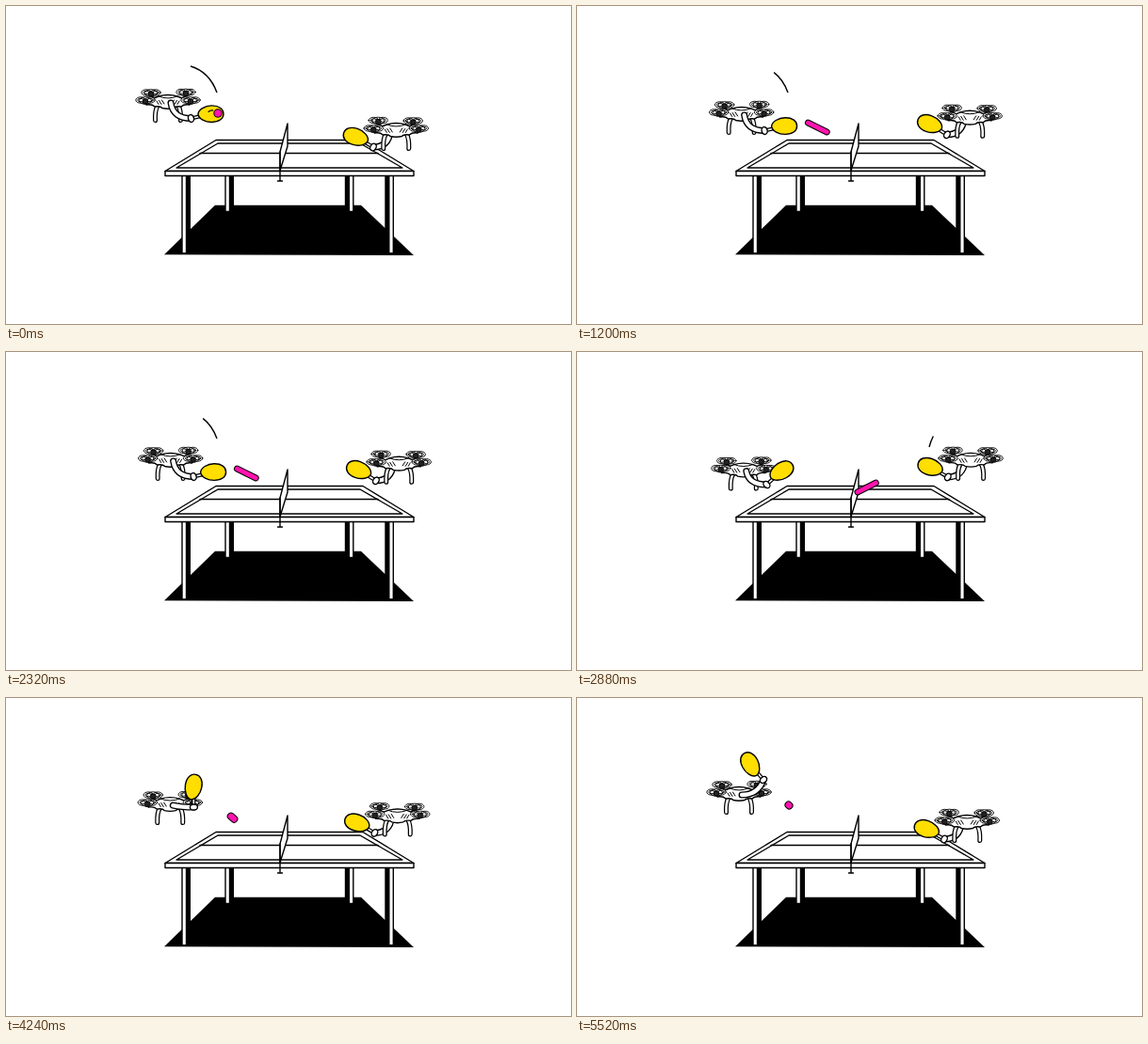
Recreate the animation shown at these times as an HTML page. Size 600 by 338 pixels, loop 5600 ms.

```html
<!DOCTYPE html>
<html lang="en">
<head>
<meta charset="utf-8">
<title>Drone table tennis</title>
<style>
html, body { margin: 0; width: 100%; height: 100%; overflow: hidden; background: #fff; }
svg { display: block; width: 100vw; height: 100vh; }
</style>
</head>
<body>
<svg viewBox="0 0 600 338" fill="none" stroke="#000" stroke-width="1.4" stroke-linejoin="round" stroke-linecap="round">
  <defs>
    <g id="rotor" stroke-width=".9">
      <ellipse cx="-5" rx="5.2" ry="3.2" fill="#fff"/>
      <ellipse cx="5" rx="5.2" ry="3.2" fill="#fff"/>
      <ellipse cx="-5" rx="3.2" ry="1.7"/>
      <ellipse cx="5" rx="3.2" ry="1.7"/>
      <ellipse cy=".5" rx="6.5" ry="3.8"/>
      <rect x="-2.5" y="-1" width="5" height="5" rx="1" fill="#222"/>
    </g>
    <g id="leg">
      <path d="M11 6Q14 11 13.500 21.500" stroke-width="5"/>
      <path d="M11 6Q14 11 13.500 21.500" stroke="#fff" stroke-width="2.500"/>
    </g>
    <g id="body">
      <use href="#leg"/>
      <use href="#leg" transform="scale(-1 1)"/>
      <use href="#rotor" x="-18" y="-8"/>
      <use href="#rotor" x="19" y="-8.500"/>
      <path d="M-18-4L-9 0M19-4L9 0"/>
      <path d="M-25 1Q-16-1-10-4Q0-7 10-4Q16-1 25 1L23 5Q17 4 14 7Q8 6 6 8.500Q0 10-6 8.500Q-8 6-14 7Q-17 4-23 5Z" fill="#fff"/>
      <path d="M-10-4Q0 0 10-4M4 4L6.500 0M7 4.500L9.500 .500M10 4.500L12 1M-4 4L-6.500 0M-7 4.500L-9.500 .500M-10 4.500L-12 1" stroke-width="1"/>
      <use href="#rotor" x="-24" y="0"/>
      <use href="#rotor" x="24" y="0"/>
    </g>
    <path id="bat" d="M-13.500 0C-13-5-6-8.800 1-8.800C9-8.800 13.500-5 13.500 0C13.500 5 9 8.800 1 8.800C-6 8.800-13 5-13.500 0Z" fill="#ffde00"/>
  </defs>

  <path d="M222 211.800H377L433 265L168 264.200Z" fill="#000" stroke="none"/>
  <g id="legs"></g>
  <path d="M223 142.500H379L433 175.500H169Z" fill="#fff"/>
  <path d="M225 146H376L421 172H181Z"/>
  <path d="M206 156.500H395"/>
  <path d="M169 175.500H433V180.500H169Z" fill="#fff"/>
  <path d="M299 125V149L291 175V155Z" fill="#fff"/>
  <path d="M291 155V186M288.500 186H293.500"/>

  <path id="swingL" d="M196 64Q216 70 224 92" pathLength="1" stroke-linecap="butt"/>
  <path id="swingR" d="M402 70Q381 75 374 101" pathLength="1" stroke-linecap="butt"/>
  <g id="droneR"></g>
  <g id="droneL"></g>
  <path id="ballEdge"/>
  <path id="ball" stroke="#ff14ae"/>
  <path id="marks" stroke-width="1.100"/>
</svg>
<script>
const $ = id => document.getElementById(id);
const STEP = 80, CYCLE = 14, CENTER = 299;
const mix = (a, b, u) => a + (b - a) * u;
const mix2 = (a, b, u) => [mix(a[0], b[0], u), mix(a[1], b[1], u)];
const quarter = u => Math.sin(u * Math.PI / 2);

// Table legs: the shaded side faces the middle.
function tableLeg(x, end) {
  const shade = x < CENTER ? x + 4.5 : x - 4.5;
  const bar = (left, style) => `<rect x="${left}" y="180" width="4.500" height="${end - 180}" ${style}/>`;
  return bar(shade, 'fill="#000" stroke="none"') + bar(x, 'fill="#fff"');
}
$('legs').innerHTML = tableLeg(233, 218.5) + tableLeg(364.3, 218.5) + tableLeg(187, 262.8) + tableLeg(406.8, 262.8);

// home/drift: body travel; low/high: hand beside the body; turn: bat angle, low and high
const left = {
  el: $('droneL'), dir: 1, hit: 0, armInFront: true, fall: 1.64, snap: 1.4,
  home: [172, 100], drift: [6, 29.5], low: [24.5, 19.5], high: [26, -13], turn: [-13, -130]
};
const right = {
  el: $('droneR'), dir: -1, hit: 6, armInFront: false, fall: .86, snap: 5.6,
  home: [414.3, 130], drift: [6.7, -30], low: [-24.3, 20], high: [-27.5, -8.5], turn: [210, 309]
};

// Quick away from home until step 5, then back by step 13.
const sway = (s, fall) => s < 5 ? quarter(s / 5) ** .7 : 1 - ((s - 5) / 8) ** fall;

function drawDrone(d, s) {
  const age = (s - d.hit + CYCLE) % CYCLE;
  const raise = Math.max(0, (age - 5) / 8) ** d.snap;
  const u = sway(s, d.fall);
  const [x, y] = d.home.map((v, i) => v + d.drift[i] * u);
  const reach = mix2(d.low, d.high, raise * raise);
  const hx = x + reach[0], hy = y + reach[1];
  const sx = x + (d.armInFront ? 3 : -6), sy = y + 3;
  const bend = Math.min(.75, Math.max(.12, .45 - (hy - sy) * .025));
  const path = `M${sx} ${sy}Q${mix(sx, hx, bend)} ${Math.max(sy, hy)} ${hx} ${hy}`;
  const arm = `<path d="${path}" stroke-width="7"/><path d="${path}" stroke="#fff" stroke-width="4.300"/>`;
  const body = `<use href="#body" transform="translate(${x} ${y}) scale(${d.dir} 1)"/>`;
  const bat = `<g transform="translate(${hx} ${hy}) rotate(${mix(...d.turn, raise)})">
    <path d="M0 0H11" stroke-width="4"/><path d="M0 0H11" stroke="#fff" stroke-width="1.600"/>
    <ellipse rx="3" ry="4" fill="#fff"/>
    <use href="#bat" transform="translate(21.500 0) rotate(${12 * d.dir})"/></g>`;
  d.el.innerHTML = (d.armInFront ? body + arm : arm + body) + bat;
}

// Each shot takes 3 steps to the bounce, then `settle` steps to its end.
const shots = [
  { hit: 0, dir: 1, from: [225, 114], bounce: [316, 159], to: [370.5, 117], settle: 2 },
  { hit: 6, dir: -1, from: [367, 114], bounce: [278, 159], to: [225, 114], settle: 4 }
];

const flight = (shot, age) => age < 3
  ? mix2(shot.from, shot.bounce, age / 3)
  : mix2(shot.bounce, shot.to, quarter((age - 3) / shot.settle));

function drawBall(s) {
  const shot = shots[s < shots[1].hit ? 0 : 1], age = s - shot.hit, { dir } = shot;
  const [x, y] = flight(shot, age), [px, py] = flight(shot, age - 1);
  const resting = age === 0 || age === 3;
  const half = (resting ? 0 : age < 3 ? .65 : .2) / 2;
  const dx = (x - px) * half, dy = (y - py) * half;
  const d = `M${x - dx} ${y - dy}L${x + dx + .01} ${y + dy}`;
  const width = age === 0 ? 7.4 : age < 3 ? 5 : 6.2;
  $('ballEdge').setAttribute('d', d);
  $('ballEdge').setAttribute('stroke-width', width + 2);
  $('ball').setAttribute('d', d);
  $('ball').setAttribute('stroke-width', width);

  const marks = age === 0 ? 'M-10-1.500Q-8-3.500-5-3' : age === 3 ? 'M6.500-2V1.500M1 6L4.500 4.500' : '';
  $('marks').setAttribute('d', marks);
  $('marks').setAttribute('transform', `translate(${x} ${y}) scale(${dir} 1)`);
}

function drawSwing(el, age) {
  const shown = age >= 0 && age < 3;
  el.setAttribute('visibility', shown ? 'visible' : 'hidden');
  if (shown) el.setAttribute('stroke-dasharray', `0 ${age * .36} 2`);
}

function draw(ms) {
  const s = Math.floor(ms / STEP) % CYCLE;
  drawDrone(right, s);
  drawDrone(left, s);
  drawBall(s);
  drawSwing($('swingL'), s - left.hit);
  drawSwing($('swingR'), s - right.hit);
}

let start;
function tick(now) {
  start ??= now;
  draw(now - start);
  requestAnimationFrame(tick);
}
draw(0);
requestAnimationFrame(tick);
</script>
</body>
</html>
```
